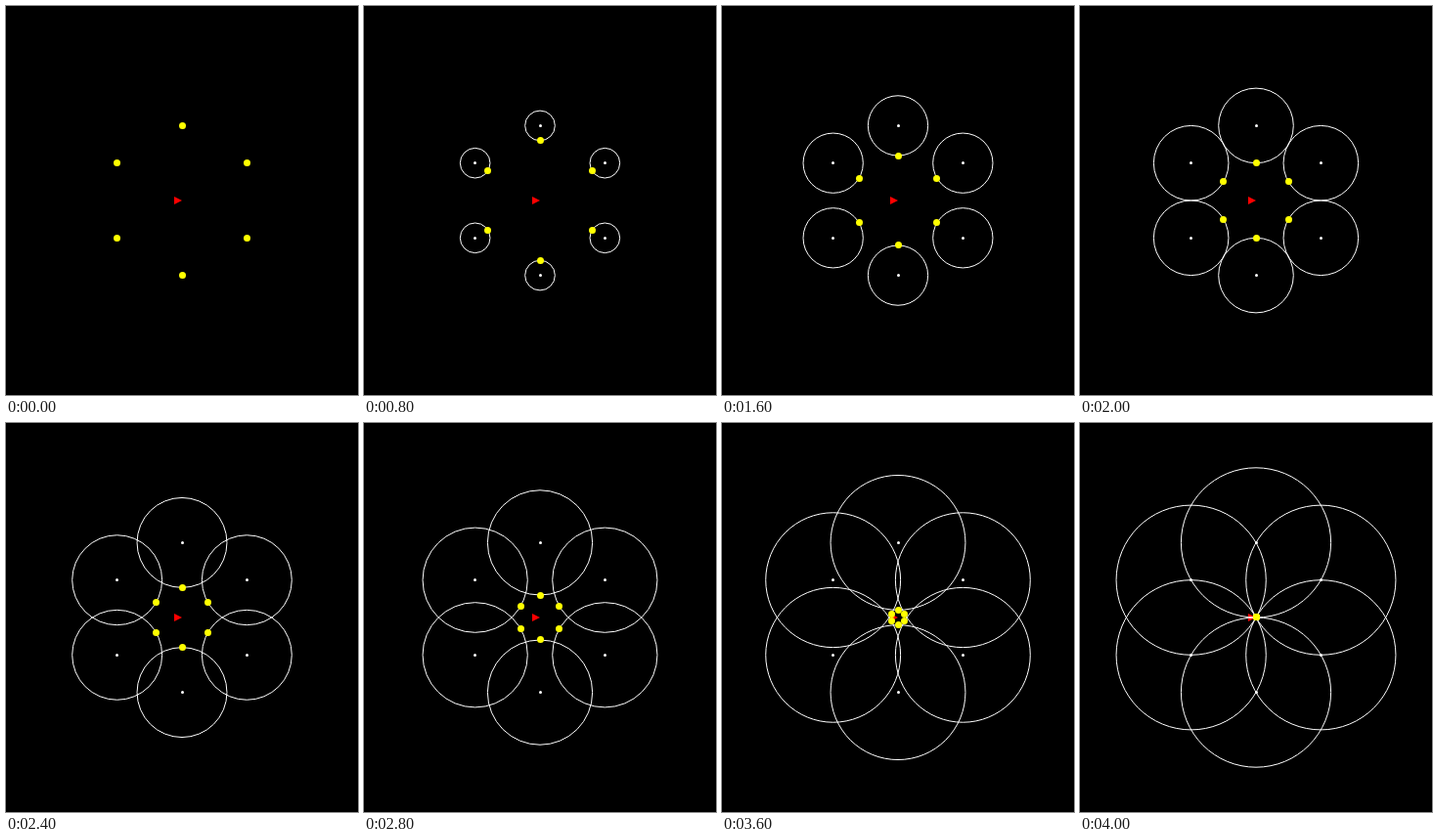
These frames come from a looping animation (360 px wide and 398 px high, 4100 ms). An HTML page with a canvas:

```html
<!DOCTYPE html>
<html lang="en">
<head>
<meta charset="utf-8">
<title>Six growing circles</title>
<style>
  html, body { margin: 0; width: 100%; height: 100%; overflow: hidden; background: #000; }
  canvas { display: block; }
</style>
</head>
<body>
<canvas id="stage" width="360" height="398"></canvas>
<script>
const ctx = document.getElementById('stage').getContext('2d');
const CX = 180, CY = 199, RADIUS = 76.6;
const STEP = 100, STEPS = 40;
const angles = Array.from({ length: 6 }, (_, k) => (30 + 60 * k) * Math.PI / 180);

const polar = (angle, r) => [CX + r * Math.cos(angle), CY + r * Math.sin(angle)];

// Dots sit on whole pixels.
function dot([x, y], r, color) {
  ctx.fillStyle = color;
  ctx.beginPath();
  ctx.arc(Math.floor(x + 0.01) + 0.5, Math.floor(y - 0.01) + 0.5, r, 0, 2 * Math.PI);
  ctx.fill();
}

function ring([x, y], r) {
  ctx.beginPath();
  ctx.arc(x, y, r, 0, 2 * Math.PI);
  ctx.stroke();
}

function arrow() {
  ctx.fillStyle = '#f00';
  ctx.beginPath();
  ctx.moveTo(CX, CY);
  ctx.lineTo(CX - 8, CY - 4);
  ctx.lineTo(CX - 8, CY + 4);
  ctx.fill();
}

function draw(step) {
  const r = RADIUS * step / STEPS;
  ctx.fillStyle = '#000';
  ctx.fillRect(0, 0, 360, 398);
  arrow();
  ctx.strokeStyle = '#fff';
  ctx.lineWidth = 1;
  for (const a of angles) {
    const center = polar(a, RADIUS);
    if (r > 0) ring(center, r);
    dot(center, 1.5, '#fff');
  }
  for (const a of angles) dot(polar(a, RADIUS - r), 3.5, '#ff0');
}

const start = performance.now();
function tick() {
  const elapsed = performance.now() - start;
  draw(Math.floor(elapsed / STEP) % (STEPS + 1));
  requestAnimationFrame(tick);
}
tick();
</script>
</body>
</html>
```
